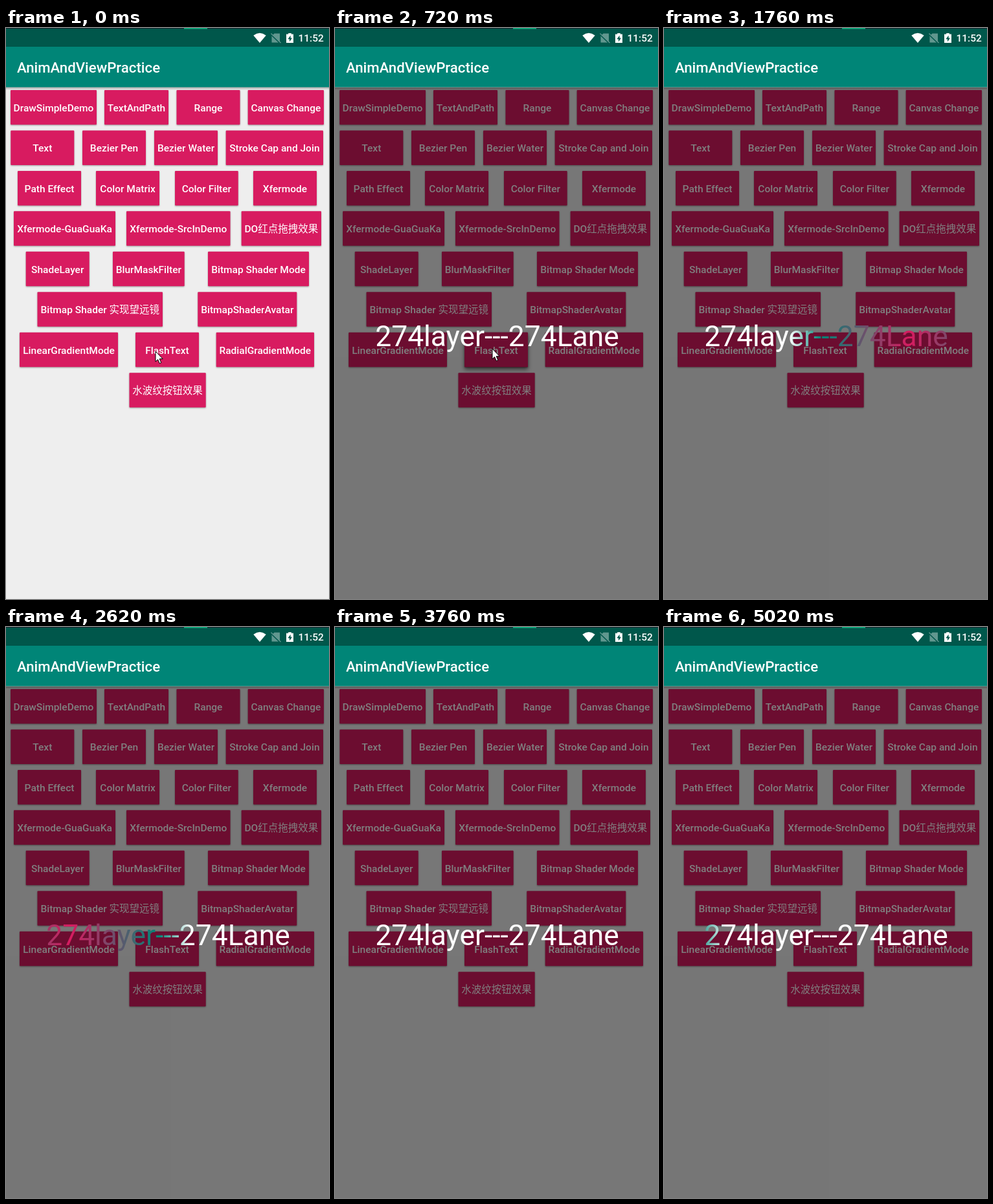
An HTML page for the animation above (5120 ms loop, 499 by 883 pixels).

```html
<!DOCTYPE html>
<html lang="en">
<head>
<meta charset="utf-8">
<title>AnimAndViewPractice</title>
<style>
html, body { margin: 0; width: 100%; height: 100%; overflow: hidden; background: #eee; }
#stage { position: relative; width: 499px; height: 883px; overflow: hidden; }
#stage > * { position: absolute; left: 0; top: 0; }
svg { display: block; }
text { font-family: Roboto, "Noto Sans CJK SC", "Noto Sans CJK", sans-serif; font-weight: 500; fill: #fff; }
.cjk { font-weight: 400; }
#buttons text { font-size: 15.5px; text-anchor: middle; }
#buttons rect { fill: #d81b60; filter: drop-shadow(0 1px 1px rgba(0, 0, 0, .35)); }
#buttons .lift {
  filter: drop-shadow(0 4px 3px rgba(0, 0, 0, .5));
  animation: lift 5120ms infinite;
}
#dialog { width: 499px; height: 883px; animation: show 5120ms step-end infinite; }
#dim { position: absolute; top: 91.5px; width: 100%; bottom: 0; background: rgba(0, 0, 0, .5); }
#flash {
  position: absolute; top: 447px; width: 501px; text-align: center; white-space: nowrap;
  font: 400 44.4px/60px Roboto, sans-serif;
  color: transparent;
  background: linear-gradient(90deg, #fff 814px, #008577 862px, #d81b60 1000px, #008577 1138px, #fff 1186px) 0 0 / 2000px 100% no-repeat;
  -webkit-background-clip: text; background-clip: text;
  animation: sweep 5120ms infinite;
}
#cursor { animation: point 5120ms step-end infinite; }

@keyframes show { 0% { opacity: 0 } 14.0625%, 100% { opacity: 1 } }
@keyframes lift {
  0%, 14.06% { opacity: 0 }
  14.0625%, 15.2% { opacity: 1 }
  18.5%, 100% { opacity: 0 }
}
@keyframes sweep {
  0% { background-position: -1182px 0; animation-timing-function: step-end }
  14.0625%, 40.8203%, 67.5781% { background-position: -1182px 0; animation-timing-function: steps(24) }
  40.8202%, 67.578% { background-position: -433.2px 0; animation-timing-function: step-end }
  94.3359% { background-position: -1182px 0; animation-timing-function: steps(5) }
  100% { background-position: -1026px 0 }
}
@keyframes point {
  0% { transform: translate(230px, 499px) }
  .977% { transform: translate(234px, 494px) }
  2.148% { transform: translate(239px, 488px) }
  3.32% { transform: translate(243px, 483px) }
  6.836% { transform: translate(244px, 486px) }
  8.008% { transform: translate(243px, 490px) }
  9.375% { transform: translate(242px, 495px) }
  25.39% { transform: translate(242px, 495px); animation-timing-function: steps(7, jump-start) }
  33.2% { transform: translate(483px, 854px) }
  33.21%, 100% { transform: translate(520px, 900px) }
}
</style>
</head>
<body>
<div id="stage">
  <svg width="499" height="883">
    <defs>
      <linearGradient id="shade" x2="0" y2="1">
        <stop stop-opacity=".32"/>
        <stop offset="1" stop-opacity="0"/>
      </linearGradient>
    </defs>
    <rect width="499" height="883" fill="#eee"/>
    <rect y="91" width="499" height="5" fill="url(#shade)"/>
    <g id="buttons"></g>
    <rect y="28" width="499" height="63.5" fill="#008577"/>
    <rect width="499" height="29" fill="#00574b"/>
    <rect width="499" height="1" fill="#16222b"/>
    <rect x="275" width="36" height="1.5" fill="#12b886"/>
    <text x="17" y="69" font-size="22.2">AnimAndViewPractice</text>
    <text x="451.5" y="21" font-size="15.5">11:52</text>
    <path d="M382.3 11.4Q392 4 401.7 11.4L392 23Z" fill="#fff"/>
    <g opacity=".38">
      <path d="M414.5 8.5H423V22.5H410.5V12.5Z" fill="#fff"/>
      <path d="M409 9.5L424 24" stroke="#00574b" stroke-width="2.2"/>
      <path d="M409.5 8.5L424.5 23" stroke="#fff" stroke-width="1.4"/>
    </g>
    <path d="M433 9.5H436.2V8H440.8V9.5H444V23H433Z" fill="#fff"/>
    <path d="M439.6 11.5L435.4 17.2H438V21.2L442 15.5H439.6Z" fill="#00574b"/>
  </svg>
  <div id="dialog">
    <div id="dim"></div>
    <div id="flash">274layer---274Lane</div>
  </div>
  <svg id="cursor" width="15" height="22">
    <path d="M1 1V17L4.6 13.6L7.2 19.7L9.8 18.6L7.2 12.7H12.2Z" fill="#fff" stroke="#000"/>
  </svg>
</div>
<script>
// each button: left edge, right edge, label
const rows = [
  [[7, 140, "DrawSimpleDemo"], [152, 251, "TextAndPath"], [263.5, 361.5, "Range"], [373.7, 491, "Canvas Change"]],
  [[7.3, 105.3, "Text"], [118, 216, "Bezier Pen"], [229, 327, "Bezier Water"], [339.7, 490, "Stroke Cap and Join"]],
  [[18, 116, "Path Effect"], [139, 237, "Color Matrix"], [261, 358.7, "Color Filter"], [382, 480, "Xfermode"]],
  [[12, 169, "Xfermode-GuaGuaKa"], [186, 346.5, "Xfermode-SrcInDemo"], [363.7, 487, "DO红点拖拽效果"]],
  [[30.7, 128.7, "ShadeLayer"], [165, 275.7, "BlurMaskFilter"], [312, 468, "Bitmap Shader Mode"]],
  [[48.5, 242, "Bitmap Shader 实现望远镜"], [296.3, 449.3, "BitmapShaderAvatar"]],
  [[21, 173, "LinearGradientMode"], [200, 298, "FlashText"], [324.7, 476, "RadialGradientMode"]],
  [[190.5, 308.7, "水波纹按钮效果"]]
];

const button = (left, right, label, top) => {
  const rect = cls => `<rect ${cls} x="${left}" y="${top}" width="${right - left}" height="53.5" rx="1"/>`;
  const words = label.replace(/[\u4e00-\u9fff]+/g, '<tspan class="cjk">$&</tspan>');
  return rect("") + (label === "FlashText" ? rect('class="lift"') : "") +
    `<text x="${(left + right) / 2}" y="${top + 32.8}">${words}</text>`;
};

document.getElementById("buttons").innerHTML = rows
  .map((row, i) => row.map(b => button(...b, 96 + 62.45 * i)).join(""))
  .join("");
</script>
</body>
</html>
```
